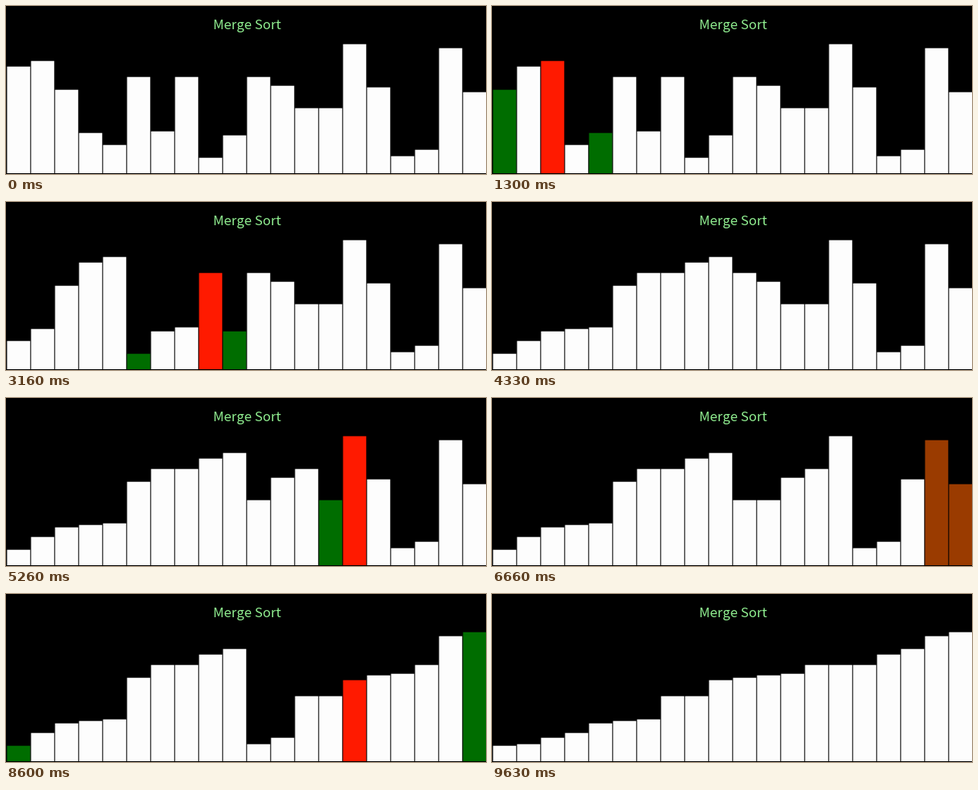
Write a matplotlib script that moves like this. It is 600 px wide and 210 px high and loops after 10000 ms.

```python
import numpy as np
import matplotlib.pyplot as plt
from matplotlib.animation import FuncAnimation
from matplotlib.colors import to_rgb

W, H, DPI = 600, 210, 100
PX = 72 / DPI
BAR, LEFT, BASE = 30, 0.85, 0.3
TALLEST = 162
INTERVAL, FRAMES = 20, 500
FPS = 30

WHITE, RED, GREEN = (np.array(to_rgb(c)) for c in ("#fdfdfd", "#ff1a00", "#006d00"))

START = [134, 141, 105, 51, 36, 121, 53, 121, 20, 48,
         121, 110, 82, 82, 162, 108, 22, 30, 157, 102]
N = len(START)

# Pacing: work done so far against clock time in ms
WORK = [0, 25.7, 59.9, 76.6, 96.9, 124.6, 146.6, 178.4]
CLOCK = [60, 1310, 3172, 4220, 5272, 6675, 7808, 9320]
STEP, COMPARE = 1.0, 0.4

states, costs = [], []


def record(values, cost, lo=None, hi=None, cursor=None):
    heights = np.array(values) * TALLEST / max(values)
    colors = np.tile(WHITE, (N, 1))
    if lo is not None:
        colors[[lo, hi]] = GREEN
    if cursor is not None:
        colors[cursor] = RED
    states.append((heights, colors))
    costs.append(cost)


def merge(a, lo, mid, hi):
    for k in range(lo, hi + 1):
        record(a, STEP, lo, hi, k)
    left, right = a[lo:mid + 1], a[mid + 1:hi + 1]
    k = lo
    while left and right:
        a[k] = (left if left[0] <= right[0] else right).pop(0)
        record(a, COMPARE, lo, hi)
        k += 1
    for v in left + right:
        a[k] = v
        record(a, STEP, lo, hi, k)
        k += 1


def merge_sort(a, lo, hi):
    record(a, STEP)
    if lo < hi:
        mid = (lo + hi) // 2
        merge_sort(a, lo, mid)
        merge_sort(a, mid + 1, hi)
        merge(a, lo, mid, hi)


data = list(START)
merge_sort(data, 0, N - 1)
record(data, STEP)
starts = np.interp(np.cumsum([0] + costs[:-1]), WORK, CLOCK)


def state_at(ms):
    return states[max(0, np.searchsorted(starts, ms, side="right") - 1)]


def mix(a, b):
    """Average two colours, the brighter one counting more."""
    wa, wb = np.sqrt(a.max()), np.sqrt(b.max())
    return (a * wa + b * wb) / (wa + wb)


fig = plt.figure(figsize=(W / DPI, H / DPI), dpi=DPI, facecolor="black")
ax = fig.add_axes([0, 0, 1, 1])
ax.set_xlim(0, W)
ax.set_ylim(0, H)
ax.axis("off")

xs = np.arange(N) * BAR + LEFT
style = dict(bottom=BASE, align="edge", linewidth=0, snap=False)
solid = ax.bar(xs, START, BAR, **style)
ghost = ax.bar(xs, START, BAR, **style)
grid = dict(color="black", linewidth=PX, zorder=3, snap=False)
ax.vlines(xs, 0, H, **grid)
ax.hlines(0.5, 0, W, **grid)
ax.text(301.2, H - 29, "Merge Sort", color="#90ee90", ha="center", va="baseline",
        family="Noto Sans CJK JP", fontsize=16.7 * PX, zorder=4)


def draw(i):
    # Each video frame averages two moments half a frame apart
    shot = int((i * INTERVAL + 7) * FPS / 1000)
    t = shot * 1000 / FPS
    h0, c0 = state_at(t + 1)
    h1, c1 = state_at(t + 500 / FPS)
    for k in range(N):
        low, high = sorted((h0[k], h1[k]))
        solid[k].set_height(low)
        solid[k].set_facecolor(mix(c0[k], c1[k]))
        ghost[k].set_y(BASE + low)
        ghost[k].set_height(high - low)
        ghost[k].set_facecolor((c0[k] if h0[k] > h1[k] else c1[k]) * 0.47)
    return [*solid, *ghost]


anim = FuncAnimation(fig, draw, frames=FRAMES, interval=INTERVAL,
                     repeat=True, repeat_delay=0, blit=False)
plt.show()
```
